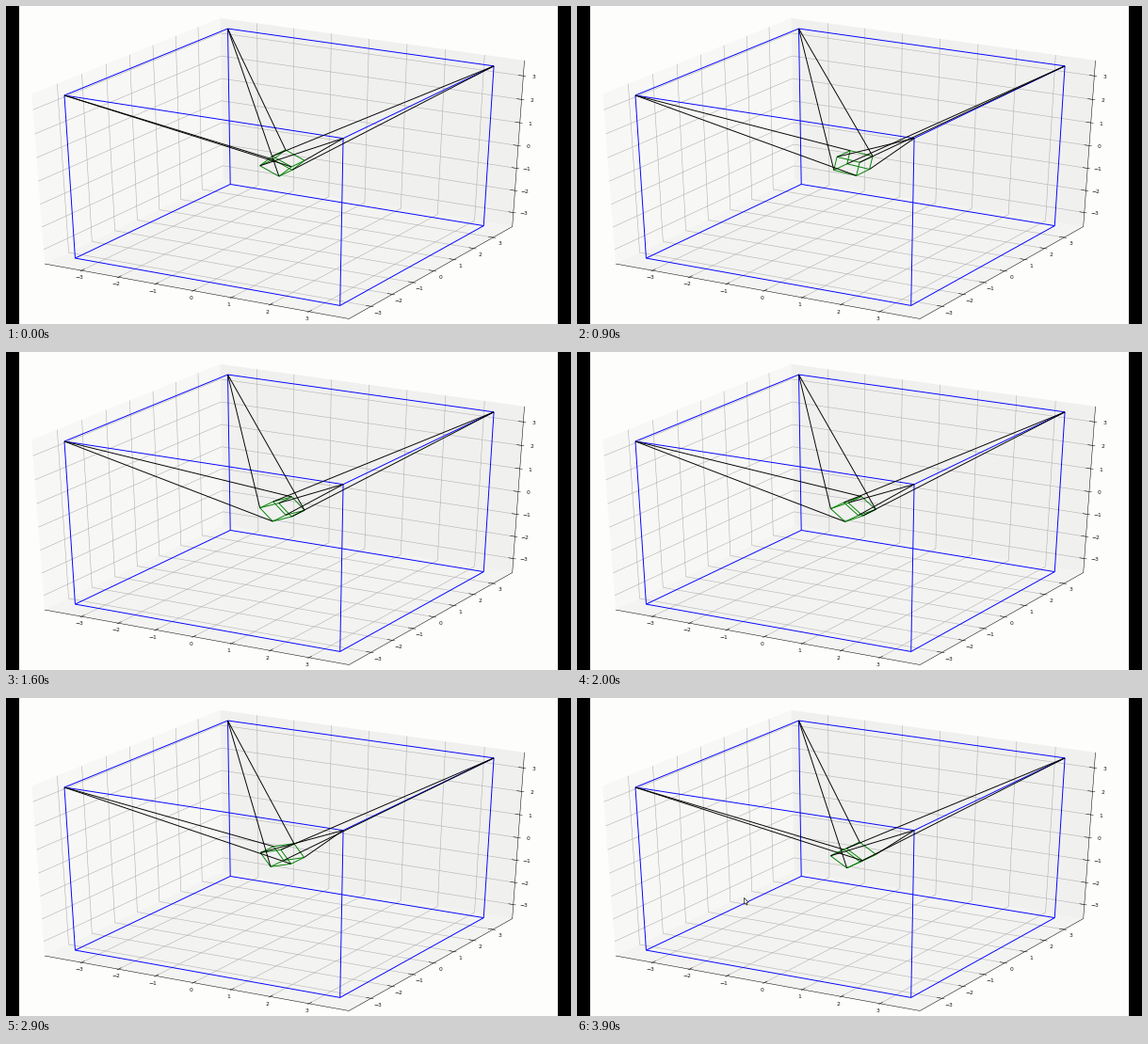
Animation of 600x338 px, one loop 4000 ms. Source, as a matplotlib script:

```python
import itertools
import math

import matplotlib.pyplot as plt
import numpy as np
from matplotlib.animation import FuncAnimation
from matplotlib.patches import Polygon, Rectangle

W, H, DPI = 600, 338, 100
FRAMES, INTERVAL = 40, 100
PT = 72 / DPI

# Camera: azimuth -60, elevation 30, ten box lengths away
AZ, EL, DIST = math.radians(-60), math.radians(30), 10
RIGHT = np.array([-math.sin(AZ), math.cos(AZ), 0])
UP = np.array([-math.sin(EL) * math.cos(AZ), -math.sin(EL) * math.sin(AZ), math.cos(EL)])
TOWARD = np.array([math.cos(EL) * math.cos(AZ), math.cos(EL) * math.sin(AZ), math.sin(EL)])
CENTER = 293.4, 167.0
SCALE = 358.0, 197.8

ROOM = 3.5
LIMIT = np.array([3.85, 3.85, 3.5])
EX, EY, EZ = LIMIT * 25 / 24
SPAN = 2 * LIMIT / 12
HALF = 0.3
SWING, PERIOD, PHASE = 1.0, 3.61, 0.82


def project(points):
    p = np.asarray(points, float) / (2 * LIMIT)
    w = 1 - p @ TOWARD / DIST
    return np.column_stack([CENTER[0] + SCALE[0] * (p @ RIGHT) / w,
                            CENTER[1] - SCALE[1] * (p @ UP) / w])


def line(points, color, width, z):
    xy = project(points)
    return ax.plot(xy[:, 0], xy[:, 1], color=color, lw=width * PT, zorder=z,
                   solid_capstyle="butt")[0]


def pane(corners, gray):
    ax.add_patch(Polygon(project(corners), fc=gray, ec="none", zorder=1))


def tick(point, axis, sign, label, shift):
    ends = np.array([point, point], float)
    ends[:, axis] += sign * SPAN[axis] * np.array([0.1, -0.2])
    line(ends, "black", 0.5, 4)
    x, y = project([point])[0] + shift
    ax.text(x, y, label, size=6 * PT, ha="center", va="center", color="#111111", zorder=5)


SIGNS = np.array(list(itertools.product((-1, 1), repeat=3)))
EDGES = [(i, j) for i, j in itertools.combinations(range(8), 2)
         if np.sum(SIGNS[i] != SIGNS[j]) == 1]

# Upper room corner and one platform vertex; its opposite holds the second cable
ANCHORS = [((-1, -1, 1), (1, -1, -1)), ((-1, 1, 1), (1, 1, 1)),
           ((1, 1, 1), (1, -1, 1)), ((1, -1, 1), (1, 1, -1))]
CABLES = [(np.array(corner) * ROOM, s * np.array(vertex) * HALF)
          for corner, vertex in ANCHORS for s in (1, -1)]

plt.rcParams["font.family"] = "DejaVu Sans"
fig = plt.figure(figsize=(W / DPI, H / DPI), dpi=DPI, facecolor="#fdfdfc")
ax = fig.add_axes([0, 0, 1, 1])
ax.set_xlim(0, W)
ax.set_ylim(H, 0)
ax.axis("off")

pane([(-EX, -EY, -EZ), (-EX, EY, -EZ), (-EX, EY, EZ), (-EX, -EY, EZ)], "#f7f7f6")
pane([(-EX, EY, -EZ), (EX, EY, -EZ), (EX, EY, EZ), (-EX, EY, EZ)], "#f0f0ef")
pane([(-EX, -EY, -EZ), (EX, -EY, -EZ), (EX, EY, -EZ), (-EX, EY, -EZ)], "#f3f3f2")

for n in range(-3, 4):
    for path in ([(n, -EY, -EZ), (n, EY, -EZ), (n, EY, EZ)],
                 [(EX, n, -EZ), (-EX, n, -EZ), (-EX, n, EZ)],
                 [(-EX, -EY, n), (-EX, EY, n), (EX, EY, n)]):
        line(path, "#b0b0b0", 0.55, 2)
    text = str(n).replace("-", "\u2212")
    tick((n, -EY, -EZ), 1, -1, text, (-2.8, 7.8))
    tick((EX, n, -EZ), 0, 1, text, (6.8, 6.8))
    tick((EX, EY, n), 0, 1, text, (10.7, 1.0))

line([(-EX, -EY, -EZ), (EX, -EY, -EZ), (EX, EY, -EZ), (EX, EY, EZ)], "black", 0.5, 4)

for i, j in EDGES:
    line(SIGNS[[i, j]] * ROOM, "#0000ff", 0.95, 6)

box = [line(SIGNS[[i, j]] * HALF, "#008000", 0.95, 7) for i, j in EDGES]
cables = [line(ends, "black", 0.95, 8) for ends in CABLES]

for x in (0, 585.5):
    ax.add_patch(Rectangle((x, 0), 14, H, fc="black", ec="none", zorder=9))
ax.add_patch(Rectangle((599, 0), 1, H, fc="black", ec="none", zorder=9))

ARROW = [(0, 0), (0, 6.8), (1.6, 5.4), (2.7, 7.7), (3.7, 7.2), (2.7, 5.0), (4.7, 4.8)]
pointer = ax.add_patch(Polygon(np.array(ARROW) + (177.4, 212.4), fc="white",
                               ec="#222222", lw=0.7 * PT, zorder=10))


def update(frame):
    t = frame * INTERVAL / 1000
    a = SWING * math.sin(2 * math.pi * (t - PHASE) / PERIOD)
    c, s = math.cos(a), math.sin(a)
    turn = np.array([[c, 0, s], [0, 1, 0], [-s, 0, c]])
    verts = project(SIGNS * HALF @ turn.T)
    for artist, (i, j) in zip(box, EDGES):
        artist.set_data(verts[[i, j], 0], verts[[i, j], 1])
    for artist, (corner, vertex) in zip(cables, CABLES):
        xy = project([corner, turn @ vertex])
        artist.set_data(xy[:, 0], xy[:, 1])
    pointer.set_visible(frame == FRAMES - 1)
    return box + cables + [pointer]


anim = FuncAnimation(fig, update, frames=FRAMES, interval=INTERVAL, repeat=True,
                     repeat_delay=0, blit=False)
plt.show()
```
